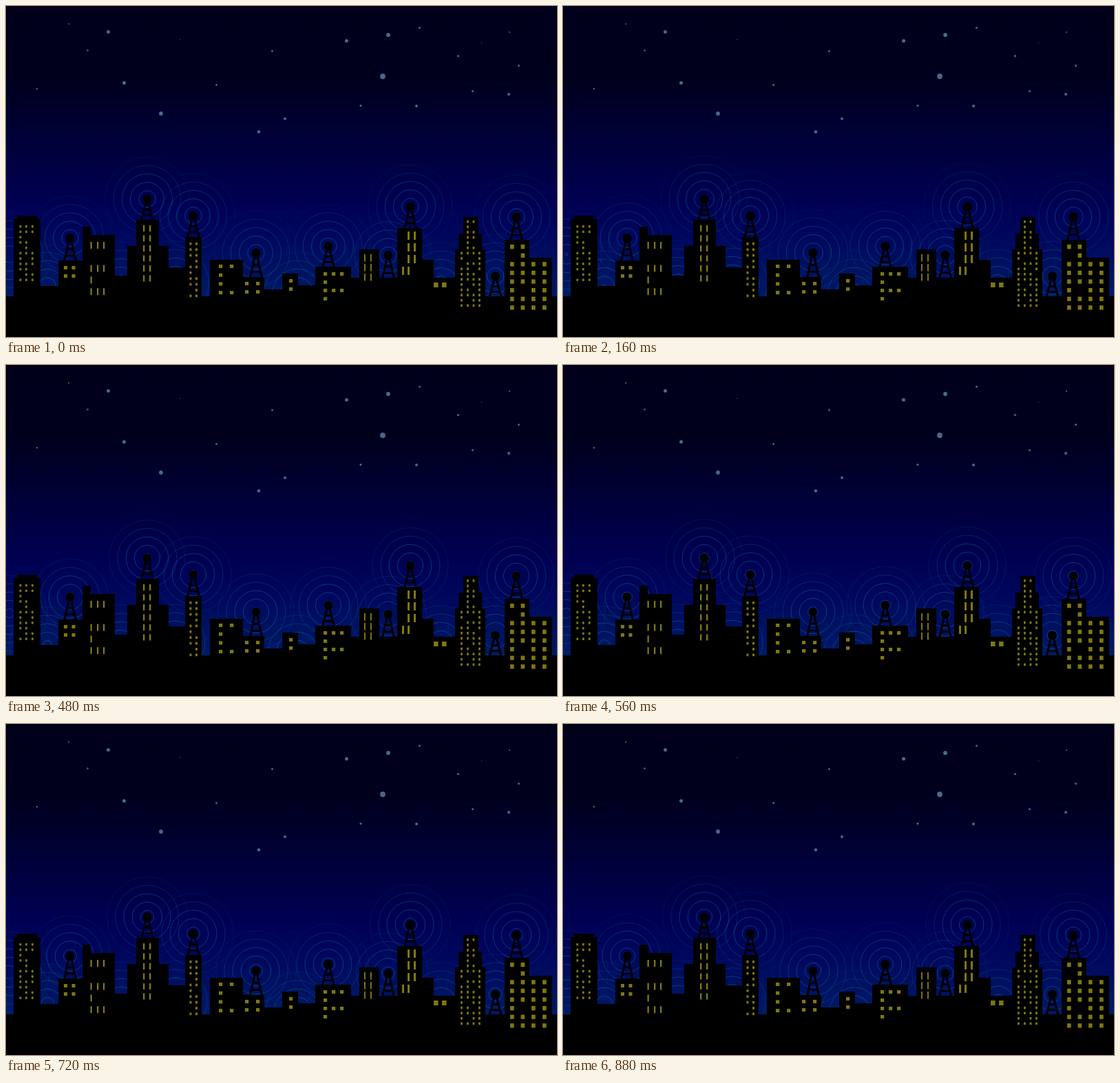
An HTML page for the animation above (0.92 s loop, 800 px wide and 480 px high).

```html
<!DOCTYPE html>
<html lang="en">
<head>
<meta charset="utf-8">
<title>City signals at night</title>
<style>
html, body { margin: 0; width: 100%; height: 100%; overflow: hidden; background: #000; }
svg { display: block; width: 100vw; height: 100vh; }
</style>
</head>
<body>
<svg viewBox="0 0 800 480">
  <defs>
    <linearGradient id="sky" x1="0" y1="0" x2="0" y2="421" gradientUnits="userSpaceOnUse">
      <stop offset="0" stop-color="#00001b"/>
      <stop offset=".24" stop-color="#00001c"/>
      <stop offset=".46" stop-color="#000038"/>
      <stop offset=".67" stop-color="#000052"/>
      <stop offset=".8" stop-color="#00075c"/>
      <stop offset="1" stop-color="#001a66"/>
    </linearGradient>
  </defs>
  <rect width="800" height="480" fill="url(#sky)"/>
  <g id="stars"></g>
  <g id="rings" fill="none" stroke="#0883ad" stroke-width=".8"></g>
  <g id="city"></g>
  <g id="masts" stroke="#000" stroke-width="3"></g>
  <g id="windows" fill="#7f780f"></g>
</svg>
<script>
const LOOP = 920, STEP = 40, GAP = 12.2, COUNT = 6, REACH = 70;

function add(parent, tag, attrs) {
  const el = document.createElementNS('http://www.w3.org/2000/svg', tag);
  for (const k in attrs) el.setAttribute(k, attrs[k]);
  document.getElementById(parent).appendChild(el);
  return el;
}

function rect(parent, x, y, width, height) {
  add(parent, 'rect', { x, y, width, height });
}

// x, y, radius
const stars = [
  [91, 26, 1], [148.5, 37.5, 2.5], [118.5, 64.5, 1.3], [171.5, 111.5, 2.5],
  [45, 120, 1.2], [225, 156, 2.9], [252.5, 48.5, 0.6], [305.5, 114.5, 1.4],
  [386.5, 65.5, 1.4], [367, 182.5, 2.2], [405, 163.5, 2], [494.5, 50.5, 2.5],
  [555, 42, 2.9], [600.5, 31.5, 1.5], [547, 102, 3.9], [515, 144.5, 1.6],
  [596, 145, 2], [656.5, 72.5, 1.6], [690.5, 53.5, 0.6], [731, 38, 1],
  [744.5, 86.5, 1.5], [677.5, 123.5, 1.5], [730, 128, 2]
];
stars.forEach(([cx, cy, r], i) =>
  add('stars', 'circle', { cx, cy, r, fill: i % 3 ? '#496889' : '#3f7090' }));

// left, right, top
const blocks = [
  [0, 800, 421], [11, 50, 309], [16, 45, 304], [50, 76, 406], [76, 111, 369],
  [111, 123, 320], [123, 158, 332], [158, 176, 391], [176, 236, 348],
  [189, 222, 310], [236, 260, 379], [260, 284, 335], [296, 344, 368],
  [344, 375, 393], [375, 401, 411], [401, 424, 388], [424, 449, 405],
  [449, 501, 378], [501, 513, 394], [513, 542, 353], [542, 568, 394],
  [568, 604, 322], [604, 621, 368], [621, 652, 394], [652, 696, 353],
  [657, 691, 330], [664, 686, 306], [724, 760, 339], [760, 793, 365]
];
for (const [l, r, top] of blocks) rect('city', l, top, r - l, 480 - top);

// x, head y, foot y
const masts = [
  [93, 336.5, 369], [205, 280, 310], [272, 304, 335], [363, 358, 393],
  [468, 348.5, 378], [555, 361.5, 394], [587, 291, 322], [741, 306, 339],
  [710.5, 392, 421]
];
function line(x1, y1, x2, y2) {
  add('masts', 'line', { x1, y1, x2, y2 });
}
for (const [x, y, foot] of masts) {
  add('masts', 'circle', { cx: x, cy: y, r: 6.6, 'stroke-width': 0 });
  for (const s of [-1, 1]) line(x + s * 1.5, y + 3, x + s * 8.5, foot + 1);
  for (const f of [0.5, 0.78]) {
    const ry = y + (foot - y) * f;
    line(x - 9 * f, ry, x + 9 * f, ry);
  }
}

// A grid of lit windows; dark lists the unlit rows of each column.
function grid(cols, y, pitch, rows, w, h, dark = []) {
  cols.forEach((x, i) => {
    for (let j = 0; j < rows; j++)
      if (!dark[i]?.includes(j)) rect('windows', x, y + j * pitch, w, h);
  });
}
grid([19.5, 28, 37], 318, 7.75, 11, 2.8, 3.4, [[4, 9], [2, 6], [2, 3, 4, 8]]);
grid([84, 95.5], 377, 12, 2, 5, 5);
grid([122.5, 132, 141], 342, 16.8, 5, 2.3, 10, [[1], [1, 3], [1, 3]]);
grid([199, 208], 318, 14.5, 6, 2.4, 9);
grid([266.5, 275], 343, 8.4, 10, 3, 3.6, [[3, 8], [5]]);
grid([309, 325], 375, 12.7, 4, 5.3, 5, [[], [1, 2]]);
grid([347, 363], 400, 12, 2, 5.2, 5);
grid([411], 396, 12, 2, 5.2, 5);
grid([461, 473, 485], 386, 12, 4, 5.2, 5, [[], [1, 3], [1, 3]]);
grid([520, 529], 360, 14, 3, 1.9, 10.5);
grid([583, 592], 327, 17, 3, 3, 12);
grid([575, 583], 378, 17, 1, 3, 12);
grid([621, 633], 401, 12, 1, 6.5, 7);
grid([669, 677.5], 311, 7.6, 6, 2.8, 3.6, [[], [1, 4]]);
grid([660, 669, 677.5, 686], 356.6, 7.6, 11, 2.8, 3.6, [[2], [1, 6, 9], [1, 3, 7], [4]]);
grid([732, 747.5], 346, 12.6, 2, 5.6, 6.3, [[1]]);
grid([732, 747.5, 763, 779], 371.2, 12.6, 6, 5.6, 6.3, [[], [3]]);

// Emitters hidden behind the skyline join those on the masts.
const hidden = [[5, 360], [60, 406], [167, 403], [246, 402], [423, 418], [631.5, 404]];
const rings = [];
for (const [cx, cy] of [...masts, ...hidden])
  for (let k = 0; k < COUNT; k++)
    rings.push({ k, el: add('rings', 'circle', { cx, cy }) });

function draw(ms) {
  const p = Math.floor(ms % LOOP / STEP) * STEP / LOOP;
  for (const { k, el } of rings) {
    const r = GAP * (k + p);
    el.setAttribute('r', r);
    el.setAttribute('opacity', Math.max(0, Math.min(0.55, 0.95 * (1 - r / REACH))));
  }
}

const start = performance.now();
function tick() {
  draw(performance.now() - start);
  requestAnimationFrame(tick);
}
tick();
</script>
</body>
</html>
```
